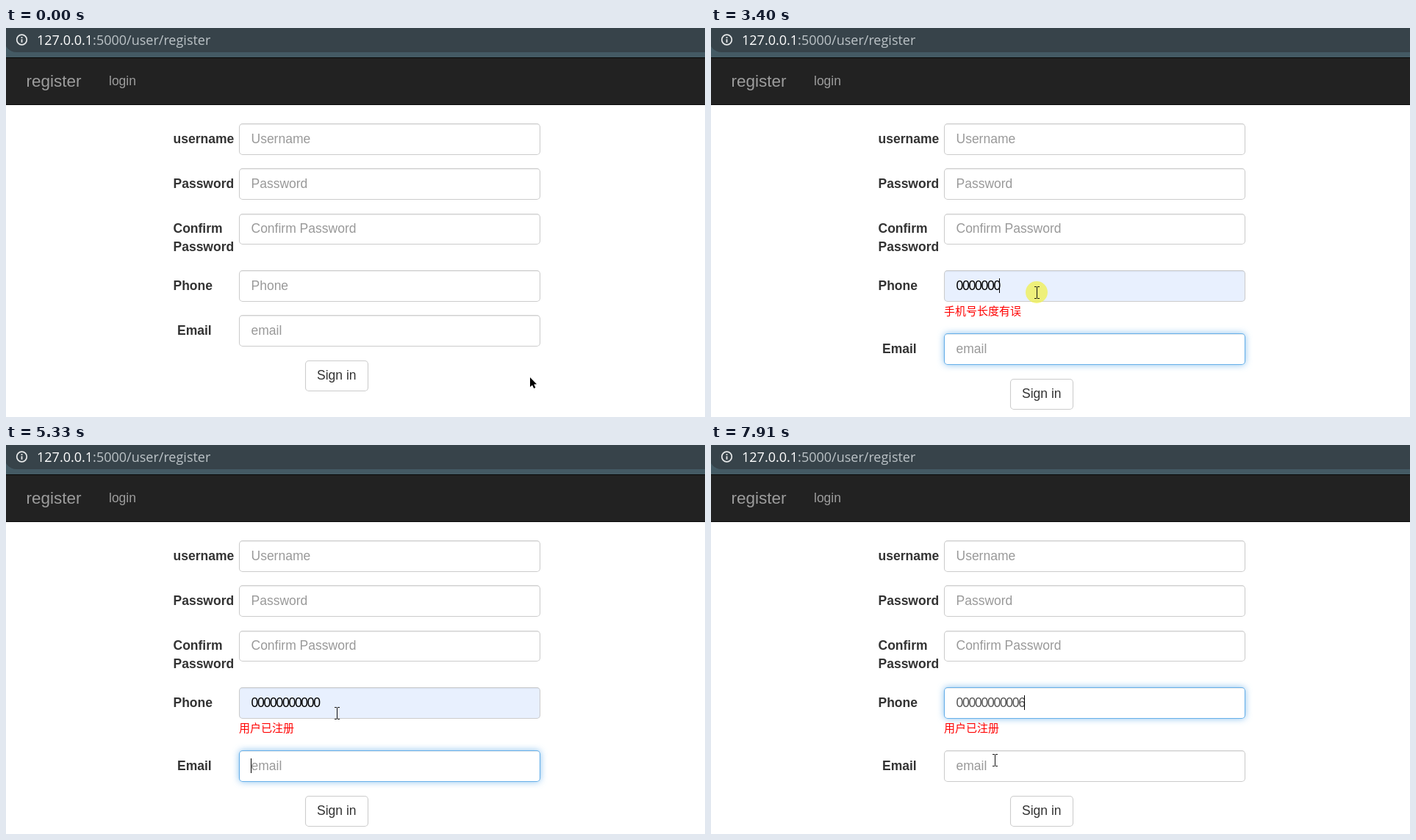
Animation of 951 by 530 pixels, one loop 7.99 s. Source, as an HTML page with a canvas:

```html
<!DOCTYPE html>
<html lang="zh">
<head>
<meta charset="utf-8">
<title>register</title>
<style>
html, body { margin: 0; width: 100%; height: 100%; overflow: hidden; background: #fff; }
canvas { display: block; }
</style>
</head>
<body>
<canvas id="stage" width="951" height="530"></canvas>
<script>
const ctx = document.getElementById('stage').getContext('2d');
const LOOP = 7990, STEP = 77, BLINK = 530, FADE = 150;
const SANS = '"Liberation Sans", Arial, sans-serif';
const UI = '"Open Sans", "Noto Sans", sans-serif';
const CJK = '"Noto Sans CJK SC", "Noto Sans CJK", sans-serif';

const LONG = '00000000000', SHORT = '0000000';
const SAVED = [LONG, SHORT, '0000000455'];

// Pointer moves: start, end, target x, target y
const START = [713, 476];
const MOVES = [
  [70, 540, 423, 336], [700, 840, 410, 345], [930, 1480, 420, 461],
  [1790, 2090, 418, 391], [2170, 2400, 418, 411], [2950, 3180, 443, 360],
  [3560, 3790, 415, 404], [4330, 4710, 377, 432], [5090, 5400, 458, 357],
  [5740, 5820, 463, 351], [6140, 6140, 461, 359], [7450, 7910, 386, 429]
];
const CLICKS = [[540, 700], [1630, 1790], [2480, 2630], [3330, 3560], [3870, 4020], [4860, 5010], [5400, 5570]];
const FOCUS = [[0, ''], [620, 'phone'], [2550, 'email'], [3400, 'phone'], [4930, 'email'], [5440, 'phone']];
const MENU = [[0, []], [700, SAVED], [1710, []], [3480, SAVED], [3940, []], [6520, [LONG]], [6690, []]];
const VALUE = [[0, ''], [1710, SHORT], [3940, LONG], [6520, LONG.slice(1)], [6690, LONG.slice(1) + '6']];
const ERROR = [[0, ''], [2630, '手机号长度有误'], [5010, ''], [5160, '用户已注册']];

const lastOf = (list, t) => list.filter(e => e[0] <= t).pop();
const at = (list, t) => lastOf(list, t)[1];

function text(str, x, y, font, color, spacing = 0) {
  ctx.font = font;
  ctx.fillStyle = color;
  ctx.letterSpacing = spacing + 'px';
  ctx.fillText(str, x, y);
  const w = ctx.measureText(str).width;
  ctx.letterSpacing = '0px';
  return w;
}
const body = (str, x, y, color = '#999') => text(str, x, y, '17.5px ' + SANS, color);
const label = (str, x, y) => text(str, x, y, 'bold 17.5px ' + SANS, '#333');

function rect(x, y, w, h, color) {
  ctx.fillStyle = color;
  ctx.fillRect(x, y, w, h);
}

function box(x, y, w, h, r) {
  ctx.beginPath();
  ctx.roundRect(x, y, w, h, r);
}

function field(y, glow = 0, fill = '#fff', h = 42) {
  ctx.save();
  if (glow) {
    ctx.shadowColor = `rgba(102,175,233,${0.75 * glow})`;
    ctx.shadowBlur = 10;
  }
  box(317, y, 410, h + 1, 5);
  ctx.fillStyle = fill;
  ctx.fill();
  ctx.restore();
  rect(319, y + 1, 406, 1.3, 'rgba(0,0,0,0.06)');
  const mix = (a, b) => Math.round(a + (b - a) * glow);
  ctx.strokeStyle = `rgb(${mix(204, 102)},${mix(204, 175)},${mix(204, 233)})`;
  ctx.lineWidth = 1.1;
  box(317.5, y + 0.5, 409, h, 4.5);
  ctx.stroke();
}

function caret(x, y, age) {
  if (Math.floor(age / BLINK) % 2 === 0) rect(Math.round(x), y, 1, 20, '#000');
}

function header() {
  rect(0, 0, 951, 40, '#445a64');
  box(-2, -20, 1000, 53, 16);
  ctx.fillStyle = '#37434a';
  ctx.fill();
  ctx.strokeStyle = '#e8eaeb';
  ctx.lineWidth = 1.7;
  ctx.beginPath();
  ctx.arc(21.5, 16, 6.8, 0, 7);
  ctx.stroke();
  rect(20.6, 12.2, 1.8, 1.8, '#e8eaeb');
  rect(20.6, 15.2, 1.8, 4.6, '#e8eaeb');
  const w = text('127.0.0.1', 42, 23, '18px ' + UI, '#fff');
  text(':5000/user/register', 42 + w, 23, '18px ' + UI, '#bcc3c7');

  rect(0, 40, 951, 65, '#222');
  rect(0, 40, 951, 1, '#080808');
  rect(0, 104, 951, 1, '#080808');
  text('register', 27.5, 80, '22.5px ' + SANS, '#9d9d9d');
  body('login', 140, 78, '#9d9d9d');
}

function menu(rows, hover) {
  const h = rows.length === 1 ? 65 : 200;
  ctx.save();
  ctx.shadowColor = 'rgba(0,0,0,0.28)';
  ctx.shadowBlur = 5;
  ctx.shadowOffsetY = 1;
  box(317, 372, 411, h, 3);
  ctx.fillStyle = '#fff';
  ctx.fill();
  ctx.restore();
  if (hover >= 0) rect(317, 382 + hover * 45, 411, 45, '#e8e8e9');
  rows.forEach((row, i) => text(row, 332.5, 410 + i * 45, '600 17px ' + UI, '#202124'));
}

function pointer(t) {
  let [x, y] = START;
  for (const [a, b, tx, ty] of MOVES) {
    if (t < a) break;
    const n = Math.round((b - a) / STEP);
    const k = n ? Math.min(n, Math.floor((t - a) / (b - a) * n + 1e-6)) : 0;
    const p = (k + 1) / (n + 1), e = p * p * (3 - 2 * p);
    x += (tx - x) * e;
    y += (ty - y) * e;
  }
  return [Math.round(x), Math.round(y)];
}

function arrow(x, y) {
  ctx.beginPath();
  [[0, 0], [0, 13], [3, 10.4], [5.2, 15], [7.4, 14], [5.2, 9.6], [9, 9.3]]
    .forEach(([dx, dy]) => ctx.lineTo(x + dx, y + dy));
  ctx.closePath();
  ctx.strokeStyle = '#fff';
  ctx.lineWidth = 2;
  ctx.stroke();
  ctx.fillStyle = '#000';
  ctx.fill();
}

function beam(x, y) {
  rect(x, y - 7, 1, 15, '#111');
  for (const dy of [-8, 8]) {
    rect(x - 3, y + dy, 3, 1, '#111');
    rect(x + 1, y + dy, 3, 1, '#111');
  }
}

function draw(t) {
  const [x, y] = pointer(t);
  const rows = at(MENU, t), error = at(ERROR, t);
  const shift = error ? 25 : 0;
  const hover = rows.length && y >= 382 ? Math.min(rows.length - 1, Math.floor((y - 382) / 45)) : -1;
  const value = hover >= 0 ? rows[hover] : at(VALUE, t);
  const filled = value && t < 6520;

  const [since, focus] = lastOf(FOCUS, t);
  const before = since ? at(FOCUS, since - 1) : '';
  const fade = Math.min(1, (t - since) / FADE);
  const glow = name => focus === name ? fade : before === name ? 1 - fade : 0;

  rect(0, 0, 951, 530, '#fff');
  header();

  label('username', 227.5, 157);
  label('Password', 227.5, 218);
  label('Confirm', 227.5, 279);
  label('Password', 227.5, 304);
  label('Phone', 227.5, 357);
  label('Email', 233, 418 + shift);

  field(130);
  body('Username', 333.5, 157);
  field(191);
  body('Password', 333.5, 218);
  field(253, 0, '#fff', 41);
  body('Confirm Password', 333.5, 279);

  field(330, glow('phone'), filled ? '#e8f0fe' : '#fff');
  let end = 333;
  if (value) end += text(value, 333.5, 357, '17.5px ' + SANS, filled ? '#000' : '#555', -1.25);
  else body('Phone', 333.5, 357);
  if (error) text(error, 317, 391, '15px ' + CJK, '#f00');

  field(391 + shift, glow('email'));
  body('email', 333.5, 418 + shift);

  box(407.5, 453.5 + shift, 85, 41, 4.5);
  ctx.strokeStyle = '#ccc';
  ctx.lineWidth = 1.1;
  ctx.stroke();
  body('Sign in', 423, 479 + shift, '#333');

  // The caret restarts on focus and on every edit
  if (focus === 'phone' && hover < 0) caret(end, 341, t - Math.max(since, lastOf(VALUE, t)[0]));
  if (focus === 'email') caret(333, 402 + shift, t - since);

  if (rows.length) menu(rows, hover);

  if (CLICKS.some(([a, b]) => t >= a && t < b)) {
    ctx.fillStyle = 'rgba(240,240,70,0.72)';
    ctx.beginPath();
    ctx.arc(x, y, 15, 0, 7);
    ctx.fill();
  }
  const inField = x > 317 && x < 727 &&
    ((y >= 330 && y < 373) || (!rows.length && y >= 390 + shift && y < 434 + shift));
  (inField ? beam : arrow)(x, y);
}

let origin;
function tick(now) {
  origin ??= now;
  draw((now - origin) % LOOP);
  requestAnimationFrame(tick);
}
draw(0);
requestAnimationFrame(tick);
</script>
</body>
</html>
```
